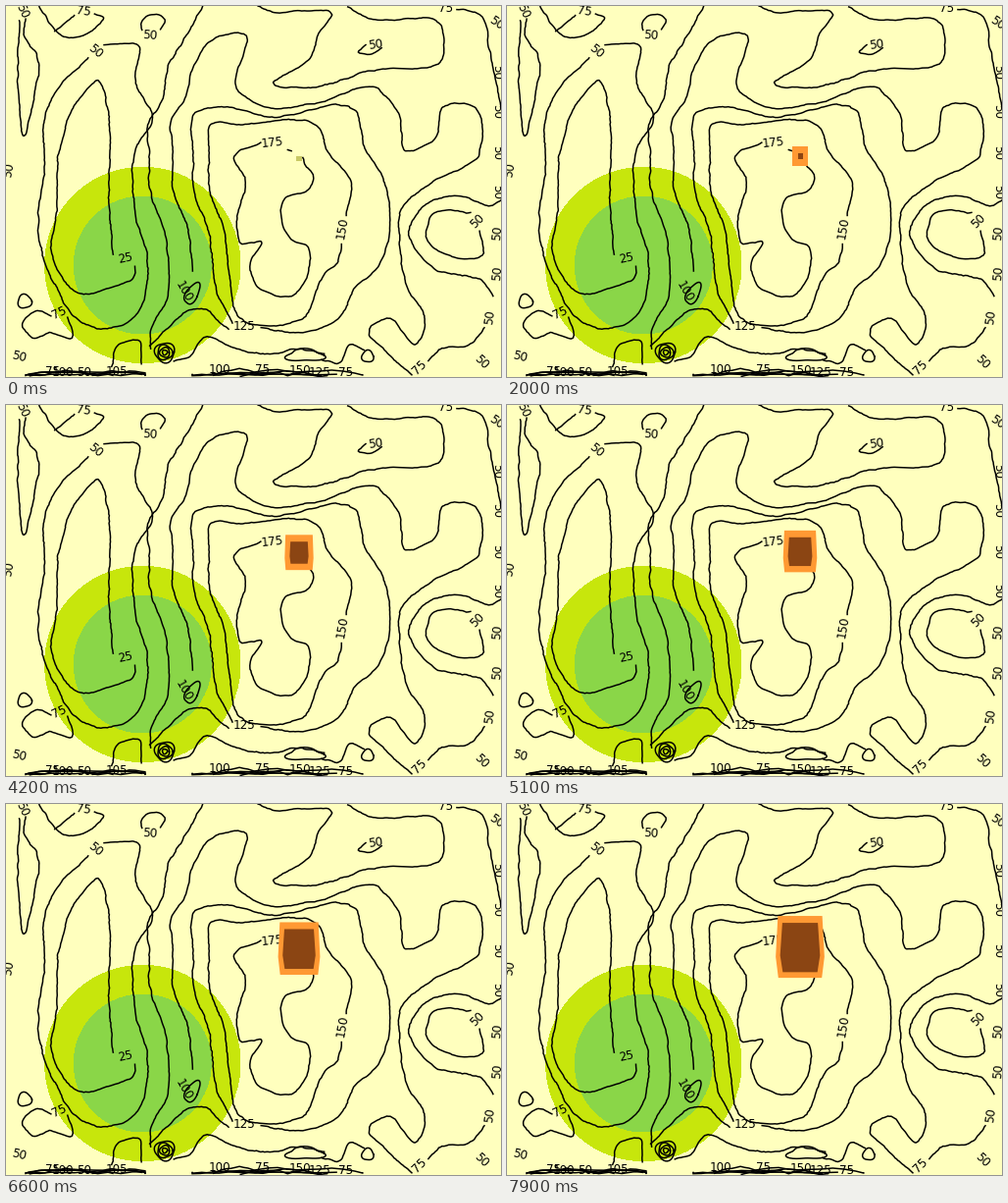
These frames come from a looping animation (505 px wide and 378 px high, 8000 ms). A matplotlib script:

```python
import numpy as np
import matplotlib.pyplot as plt
from matplotlib.animation import FuncAnimation
from matplotlib.patches import Circle, Polygon

W, H = 505, 378
PX = 0.72  # points per pixel at 100 dpi
FRAMES, STEP = 80, 100
rng = np.random.default_rng(4)

fig = plt.figure(figsize=(W / 100, H / 100), dpi=100, facecolor="#ffffbe")
ax = fig.add_axes([0, 0, 1, 1])
ax.set(xlim=(0, W), ylim=(H, 0))
ax.axis("off")

for radius, color in ((99.7, "#c7e60c"), (70, "#8ad648")):
    ax.add_patch(Circle((139.3, 264), radius, fc=color, ec="none", aa=False, zorder=1))


def smooth(points):
    """Hermite curve through the points, sampled every two pixels."""
    p = np.array(points, float)
    t = np.r_[0, np.cumsum(np.hypot(*np.diff(p, axis=0).T))]
    m = np.gradient(p, t, axis=0)
    s = np.arange(0, t[-1], 2)
    k = np.searchsorted(t, s, side="right") - 1
    h = (t[k + 1] - t[k])[:, None]
    u = (s - t[k])[:, None] / h
    v = 1 - u
    return ((1 + 2 * u) * v**2 * p[k] + u * v**2 * h * m[k]
            + (3 - 2 * u) * u**2 * p[k + 1] - v * u**2 * h * m[k + 1])


def draw(xy):
    ax.plot(*np.transpose(xy), color="black", lw=1.5 * PX, zorder=2)


def contour(*points):
    """Key points joined by a slightly shaky line."""
    xy = smooth(points)
    for axis in xy.T:
        axis += np.convolve(rng.normal(0, 0.8, len(xy) + 3), np.ones(4) / 4, "valid")
    draw(xy)


def ring(x, y, rx, ry=None, tilt=0, bump=0.1):
    a = np.linspace(0, 2 * np.pi, 40)
    r = 1 + bump * np.sin(3 * a + rx)
    z = (rx * np.cos(a) + 1j * (ry or rx) * np.sin(a)) * r * np.exp(1j * np.radians(tilt))
    draw(np.c_[x + z.real, y + z.imag])


def flank(x, y0, y1):
    """Slope line going down the stage: straight, then easing to the right."""
    y = np.linspace(y0, y1, 9)
    u = np.clip((y - 165) / 100, 0, 1)
    return list(zip(x + 22 * u * u * (3 - 2 * u) + 1.5 * np.sin(y / 11), y))


def label(text, x, y, angle=0):
    ax.text(x, y, text, rotation=angle, fontsize=12 * PX, family="DejaVu Sans",
            ha="center", va="center", zorder=2)


# western slope
contour((109, 253), (105, 190), (106, 135), (102, 95), (95, 76), (72, 98), (55, 145),
        (51, 215), (46, 247), (75, 293), (108, 286), (131, 275), (131, 264))
contour((84, 53), (52, 85), (41, 109), (39, 170), (33, 209), (36, 250), (53, 290),
        (65, 311), (95, 329), (130, 318), (145, 270), (131, 205), (134, 142),
        (149, 117), (132, 75), (135, 41), (100, 39))
contour((201, 0), (184, 31), (166, 60), (160, 94), *flank(145, 125, 270),
        (165, 296), (147, 335), (148, 350))
contour(*flank(169, 270, 120), (183, 93), (192, 60), (214, 32), (243, 29), (236, 85),
        (262, 102), (320, 98), (378, 84), (400, 108), (408, 148), (437, 135),
        (447, 102), (478, 103), (482, 152), (434, 180), (404, 206), (402, 245),
        (410, 288), (428, 320), (418, 345), (390, 318), (370, 332), (386, 350),
        (415, 377))
ring(190, 293, 6, 12, 30)

# plateau
contour((231, 323), (215, 290), *flank(190, 270, 125), (192, 110), (213, 103),
        (270, 113), (357, 108), (366, 145), (382, 170), (376, 270), (356, 287),
        (342, 316), (292, 333), (258, 327))
contour((347, 213), (352, 180), (327, 146), (321, 128), (235, 121), (208, 121),
        *flank(206, 140, 270), (239, 318), (305, 316), (326, 272), (338, 262), (342, 241))
contour((259, 139), (232, 155), (243, 174), (235, 225), (240, 242), (261, 240),
        (249, 262), (257, 286), (291, 295), (307, 245), (290, 237), (285, 195),
        (307, 188), (314, 173), (305, 162), (303, 155))
contour((287, 146), (292, 148))

# northern and eastern parts
contour((257, 0), (273, 7), (300, 5), (332, 8), (319, 28), (310, 53), (273, 79),
        (312, 83), (370, 66), (446, 52), (444, 21), (366, 11), (347, 0))
contour((367, 40), (359, 46), (373, 49), (384, 43))
contour((460, 3), (484, 9), (493, 45), (491, 203), (458, 193), (422, 208), (411, 228),
        (435, 266), (488, 283), (497, 296))
contour((474, 211), (435, 212), (430, 238), (457, 256), (486, 254), (484, 229))
contour((431, 362), (442, 350), (472, 345), (488, 328))

# western corners
contour((20, 13), (18, 28), (32, 52), (29, 90), (18, 132), (13, 98), (12, 50), (14, 14))
contour((34, 0), (48, 22), (62, 32), (93, 20), (99, 12), (89, 8))
contour((70, 9), (50, 26))
contour((139, 24), (138, 15), (147, 9), (162, 13), (157, 25))
contour((46, 316), (34, 310), (17, 325), (29, 338), (45, 333), (67, 338), (63, 317))
ring(19, 301, 7)

# southern edge
contour((108, 368), (114, 346), (135, 341), (137, 365))
contour((146, 346), (166, 327), (189, 310), (206, 310), (214, 319), (228, 330))
contour((172, 362), (186, 358), (202, 338), (235, 349), (276, 354), (290, 350), (325, 354))
contour((322, 360), (340, 364), (351, 345), (366, 351))
ring(305, 356, 19, 6, bump=0.2)
ring(369, 357, 6)
for r in (2.5, 5, 7.5, 10):
    ring(162, 353, r)
for x0, x1 in ((20, 142), (190, 364)):
    for _ in range(6):
        a, b = np.sort(rng.uniform(x0, x1, 2))
        x = np.linspace(a - 20, b + 20, 12).clip(x0, x1)
        rise = np.sin(np.linspace(0, np.pi, 12)) * rng.uniform(0, 6)
        draw(np.c_[x, 376 - rise + rng.normal(0, 0.7, 12)])

label("25", 122, 257, 12)
label("50", 91, 46, -40)
label("50", 147, 30, -4)
label("75", 79, 6, -8)
label("50", 16, 5, -65)
label("50", 3, 167, 80)
label("75", 54, 313, 25)
label("50", 13, 357, -14)
label("100", 181, 291, -60)
label("125", 243, 326)
label("150", 343, 226, 80)
label("175", 272, 139, 6)
label("50", 377, 39, 8)
label("75", 449, 2)
label("50", 481, 219, 45)
label("50", 500, 17, -35)
label("50", 494, 317, 82)
label("50", 485, 363, -45)
label("75", 422, 368, 45)
for i in range(6):
    label("50", 501, 67 + 41 * i, -90 if i < 4 else 85)
for i, x in enumerate((48, 58, 80, 113, 218, 262, 300, 320, 347)):
    label(("75", "100", "50", "105", "100", "75", "150", "125", "75")[i], x, 372 + 2 * np.sin(i))


def patch(color, z):
    return ax.add_patch(Polygon([(0, 0)] * 3, fc=color, ec="none", zorder=z))


front = patch("#ff9933", 4)
core = patch("#8b4513", 5)


def barrel(top, bottom, half, bulge):
    """Slightly bellied block, widest two thirds of the way down."""
    cx, mid = 299, top + 0.66 * (bottom - top)
    right = [(half, top), (half + bulge, mid), (half - 0.2 * bulge, bottom)]
    return [(cx + dx, y) for dx, y in right] + [(cx - dx, y) for dx, y in right[::-1]]


def update(i):
    t = i * STEP / 1000
    age = t - 2
    bulge = 0.38 * max(0, age)
    front.set_facecolor("#c8c864" if t < 0.2 else "#ff9933")
    front.set_xy(barrel(153 - 4.93 * t, 158 + 2.42 * t, 2.6 + 2.85 * t - 0.04 * t * t, bulge))
    core.set_visible(age > -0.8)
    core.set_xy(barrel(150 - 4.9 * age, 156 + 2.6 * age, 2.5 + 3 * age - 0.06 * age * age, bulge))
    return front, core


anim = FuncAnimation(fig, update, frames=FRAMES, interval=STEP, repeat=True,
                     repeat_delay=0, blit=False)
plt.show()
```
